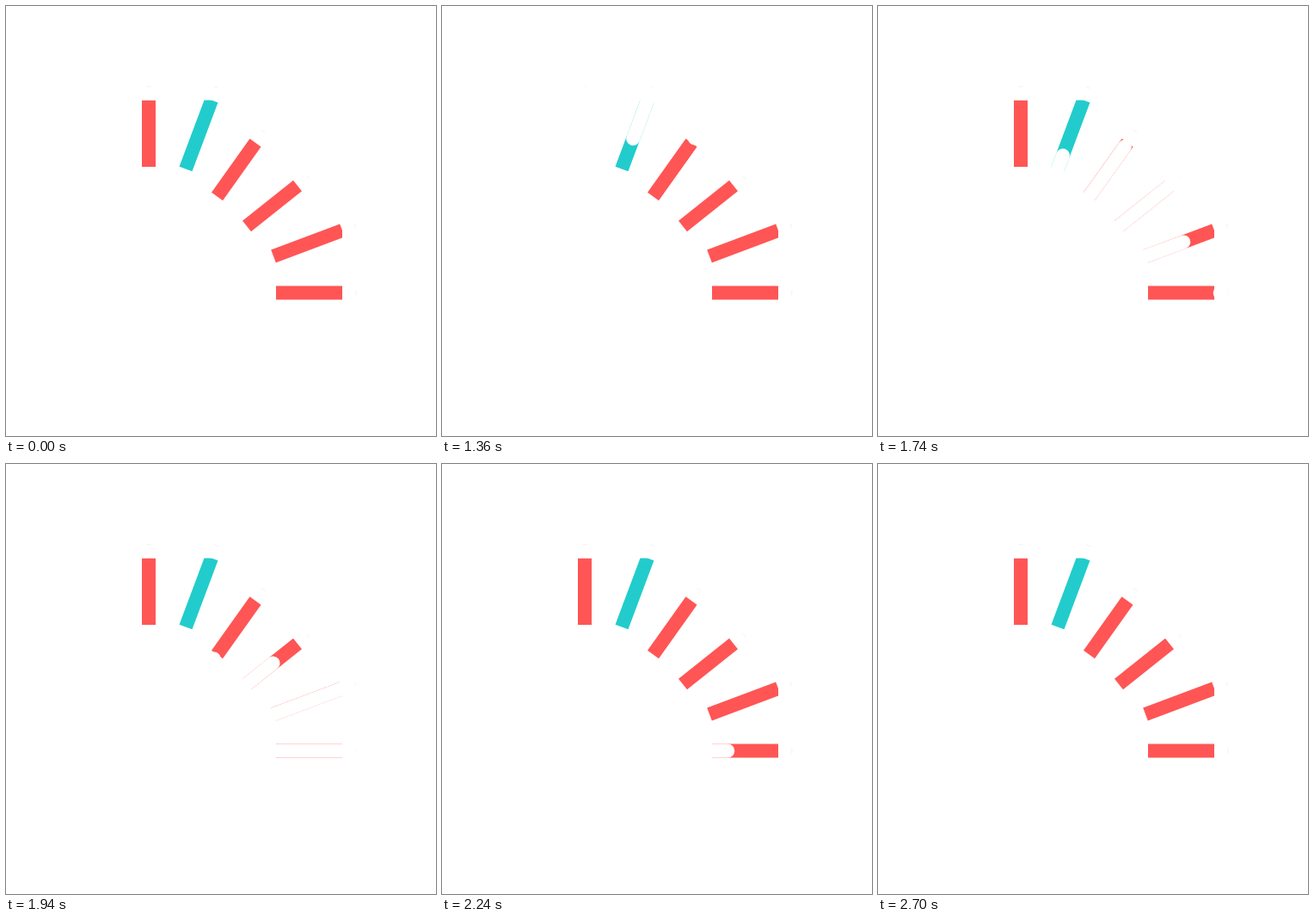
Write an HTML page with a canvas that moves like this. It is 500 px wide and 500 px high and loops after 3 s.

```html
<!DOCTYPE html>
<html lang="en">
<head>
<meta charset="utf-8">
<title>Radial bars</title>
<style>
  html, body { margin: 0; width: 100%; height: 100%; overflow: hidden; background: #fff; }
  canvas { display: block; width: 500px; height: 500px; }
</style>
</head>
<body>
<canvas id="stage" width="500" height="500"></canvas>
<script>
const ctx = document.getElementById('stage').getContext('2d');
const LOOP = 3000, START = 1085, STAGGER = 127, HIDE_TIME = 280, SHOW_DELAY = 328, SHOW_TIME = 300;
const WIDTH = 16, R = WIDTH / 2;
const RED = '#ff5555', TEAL = '#22cccc';

// inner and outer end of each bar
const bars = [
  [[166, 187], [166, 109.5]],
  [[209, 189.5], [239, 109.5]],
  [[245.5, 221.5], [290, 159]],
  [[280, 256], [339, 209]],
  [[311, 291], [391, 261]],
  [[314, 333.5], [391, 333.5]]
];

function ease(t, start, duration) {
  const x = Math.min(1, Math.max(0, (t - start) / duration));
  return (1 - Math.cos(Math.PI * x)) / 2;
}

function line(a, b, color, cap) {
  ctx.beginPath();
  ctx.moveTo(...a);
  ctx.lineTo(...b);
  ctx.strokeStyle = color;
  ctx.lineWidth = WIDTH;
  ctx.lineCap = cap;
  ctx.stroke();
}

// faint trace of the round cap beyond the outer end
function drawTip([x, y], angle) {
  ctx.beginPath();
  ctx.arc(x + R * Math.cos(angle), y + R * Math.sin(angle), R, angle - .3, angle + .3);
  ctx.strokeStyle = '#f2f2f2';
  ctx.lineWidth = 1;
  ctx.stroke();
}

function drawBar([inner, outer], i, t) {
  const [from, to] = i % 4 === 0 ? [inner, outer] : [outer, inner];
  const dx = to[0] - from[0], dy = to[1] - from[1], length = Math.hypot(dx, dy);
  const at = p => {
    const k = (p * (length + WIDTH) - R) / length;
    return [from[0] + dx * k, from[1] + dy * k];
  };

  ctx.save();
  ctx.beginPath();
  ctx.rect(0, 109.5, 391, 390.5);
  ctx.clip();
  line(inner, outer, i === 1 ? TEAL : RED, 'butt');
  ctx.restore();
  drawTip(outer, Math.atan2(outer[1] - inner[1], outer[0] - inner[0]));

  // a white stroke runs along the bar, its tail following its head
  const begin = START + i * STAGGER;
  const head = ease(t, begin, HIDE_TIME);
  const tail = ease(t, begin + SHOW_DELAY, SHOW_TIME);
  if (head > 0 && tail < 1) line(at(tail), at(head), '#fff', 'round');
}

function tick() {
  const t = performance.now() % LOOP;
  ctx.fillStyle = '#fff';
  ctx.fillRect(0, 0, 500, 500);
  bars.forEach((bar, i) => drawBar(bar, i, t));
  requestAnimationFrame(tick);
}
tick();
</script>
</body>
</html>
```
